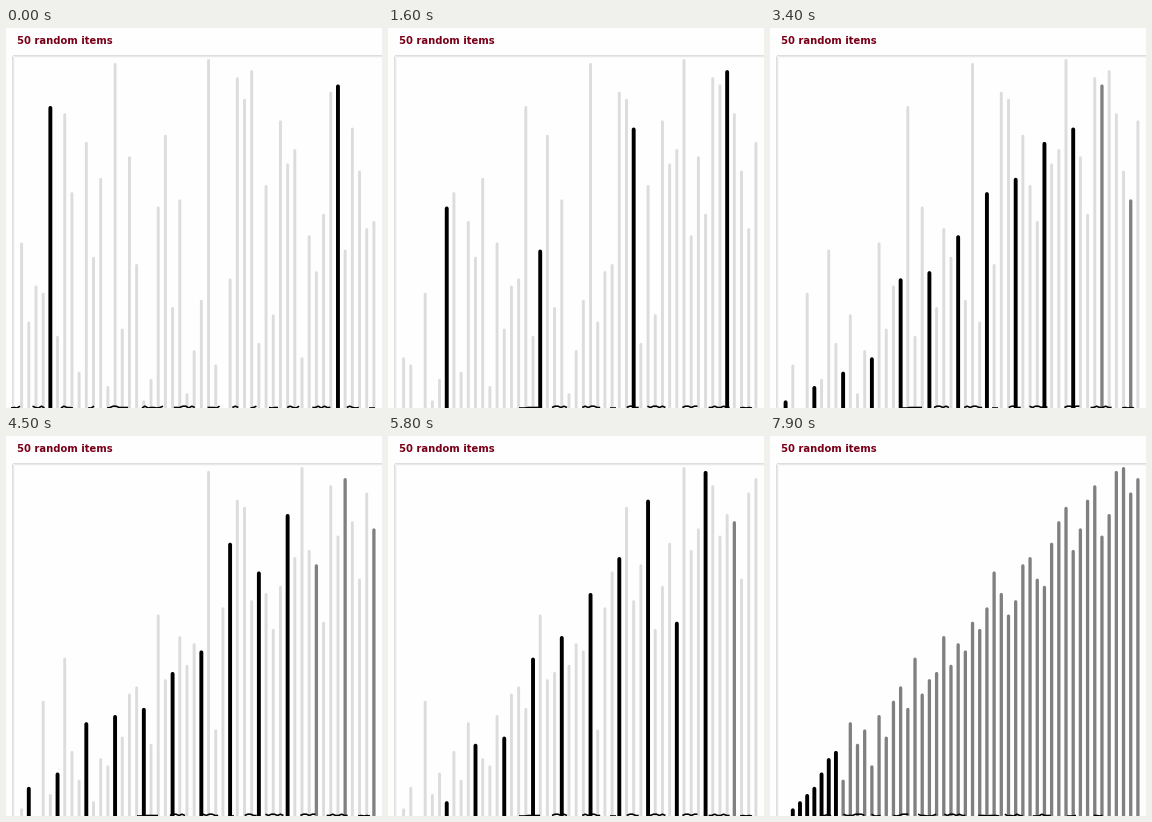
A matplotlib script that plays this animation: 376 px wide and 380 px high, repeating every 8000 ms.

```python
import random

import matplotlib.pyplot as plt
import numpy as np
from matplotlib.animation import FuncAnimation
from matplotlib.collections import LineCollection

W, H, DPI = 376, 380, 100
FRAMES, INTERVAL = 80, 100
PX = 72 / DPI  # points per pixel

# The items to sort; every later state follows from the algorithm
ITEMS = [23, 12, 17, 16, 42, 10, 41, 30, 5, 37, 21, 32, 3, 48, 11, 35, 20,
         1, 4, 28, 38, 14, 29, 2, 8, 15, 49, 6, 0, 18, 46, 43, 47, 9, 31, 13,
         40, 34, 36, 7, 24, 19, 27, 44, 45, 22, 39, 33, 25, 26]
N = len(ITEMS)
LEFT, PITCH, RISE, TOP = 15.6, 7.19, 7.18, 31.5

LIGHT, MID, BLACK = "#dcdcdc", "#808080", "#000000"
PICK_COST, SWAP_COST = 0.06, 0.77

# Pacing: frame number -> step of the sort
PACE = {0: 0, 10: 28, 23: 63, 34: 91, 45: 116, 58: 144, 79: 191}


def shell_sort(items):
    """Yield (items, gap, group, picked index, cost) for each step."""
    a = list(items)
    for gap, first in ((40, 4), (13, 0), (4, 0), (1, 0)):
        for group in range(first, gap):
            for i in range(group + gap, N, gap):
                yield a[:], gap, group, i, PICK_COST
                j = i
                while j >= gap and a[j] < a[j - gap]:
                    a[j], a[j - gap] = a[j - gap], a[j]
                    j -= gap
                    yield a[:], gap, group, i, SWAP_COST


steps = list(shell_sort(ITEMS))
clock = np.cumsum([s[-1] for s in steps])


def step_at(frame):
    t = np.interp(frame, list(PACE), clock[list(PACE.values())])
    return steps[np.searchsorted(clock, t + 1e-6, side="right") - 1]


def bar_style(i, gap, group, picked):
    if i % gap != group:
        return LIGHT, 2.9
    return (BLACK, 3.9) if i <= picked else (MID, 3.3)


fig = plt.figure(figsize=(W / DPI, H / DPI), dpi=DPI, facecolor="#fefefe")
ax = fig.add_axes([0, 0, 1, 1])
ax.set_xlim(0, W)
ax.set_ylim(H, 0)
ax.axis("off")

ax.text(11, 16, "50 random items", color="#7a0019", weight="bold",
        family="DejaVu Sans", fontsize=9.95 * PX, va="baseline")

# Panel edge with a soft inner shadow
for d, shade in enumerate(("#dedede", "#e9e9e9", "#f8f8f8")):
    ax.plot([7 + d, W], [26.5 + d] * 2, color=shade, lw=PX)
    ax.plot([5.5 + d] * 2, [28 + d, H], color=shade, lw=PX)

bars = LineCollection([], capstyle="round", snap=False, zorder=3)
ax.add_collection(bars)


def fringe(start, end, seed):
    """Jagged black dashes along the bottom edge."""
    rng = random.Random(seed)
    segs, x = [], start
    while x < end:
        stop = min(x + rng.uniform(6, 22), end)
        segs.append([(u, H - rng.choice((0, 0.5, 0.5, 1.8)))
                     for u in np.arange(x, stop + 1, 3)])
        x = stop + rng.uniform(5, 16)
    marks = LineCollection(segs, colors=BLACK, linewidths=1.6 * PX, zorder=4)
    ax.add_collection(marks)
    return marks


fringes = [fringe(5, 370, 1), fringe(131, 371, 2), fringe(52, 335, 3)]


def update(frame):
    items, gap, group, picked, _ = step_at(frame)
    segs, colors, widths = [], [], []
    for i, v in enumerate(items):
        if v == 0:
            continue
        color, width = bar_style(i, gap, group, picked)
        x = LEFT + PITCH * i
        top = max(H - RISE * v, TOP) + width / 2 - 0.5
        segs.append([(x, top), (x, H + 10)])
        colors.append(color)
        widths.append(width * PX)
    bars.set_segments(segs)
    bars.set_color(colors)
    bars.set_linewidth(widths)

    shown = 0 if frame < 15 else 1 if frame < 73 else 2
    for k, marks in enumerate(fringes):
        marks.set_visible(k == shown)
    return [bars, *fringes]


anim = FuncAnimation(fig, update, frames=FRAMES, interval=INTERVAL,
                     repeat=True, repeat_delay=0, blit=False)
plt.show()
```
